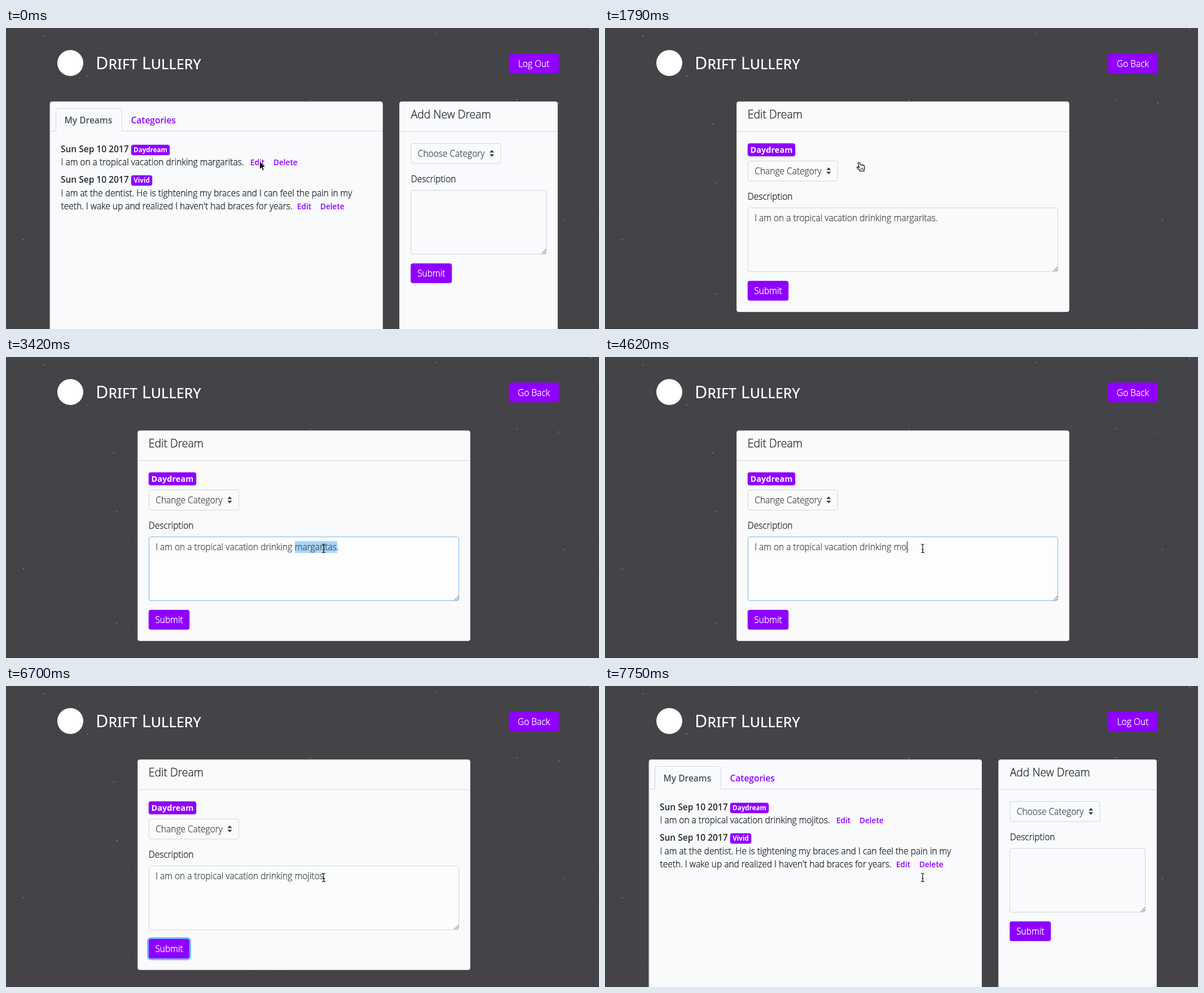
These frames come from a looping animation (1051x533 px, 8000 ms). An HTML page:

```html
<!DOCTYPE html>
<html lang="en">
<head>
<meta charset="utf-8">
<title>Drift Lullery</title>
<style>
  html, body { margin: 0; width: 100%; height: 100%; overflow: hidden; background: #444348; }
  svg { display: block; width: 1051px; height: 533px; }
  text {
    --ink: #25282b;
    font: 300 15.5px "Open Sans", "Noto Sans", sans-serif;
    fill: var(--ink); stroke: var(--ink); stroke-width: .35px; white-space: pre;
  }
  .head { font-size: 19.4px; }
  .semi { font-weight: 600; stroke: none; }
  .link { --ink: #8f00ff; font-weight: 600; font-size: 13.6px; stroke: none; }
  .field { --ink: #495057; }
  .tab { --ink: #8f00ff; }
  .white { --ink: #fff; text-anchor: middle; }
  .badge { font-weight: 700; font-size: 11.6px; stroke: none; }
  .big { font-size: 14.5px; }
  .title {
    --ink: #fff; font-family: "Noto Sans", "Open Sans", sans-serif; font-weight: 500;
    font-size: 30px; font-stretch: 62.5%; font-variant: small-caps; stroke: none;
  }
</style>
</head>
<body>
<svg id="stage" viewBox="0 0 1051 533"></svg>
<script>
const LOOP = 8000;
const PURPLE = '#8f00ff', LINE = '#d3d6da', EDGE = '#dcdcde';
const WORD_X = 511.8;

const text = (x, y, str, cls = '', id = '') =>
  `<text x="${x}" y="${y}" class="${cls}"${id && ` id="${id}"`}>${str}</text>`;
const rect = (x, y, w, h, fill, extra = '') =>
  `<rect x="${x}" y="${y}" width="${w}" height="${h}" fill="${fill}" ${extra}/>`;
const box = (x, y, w, h, fill, line = LINE, extra = '') =>
  rect(x + .5, y + .5, w - 1, h - 1, fill, `rx="3.5" stroke="${line}" ${extra}`);
const path = (d, extra) => `<path d="${d}" ${extra}/>`;
const group = (id, body) => `<g id="${id}">${body}</g>`;
const chip = (x, y, w, h) =>
  rect(x, y, w, h, PURPLE, `rx="3.5" stroke="${PURPLE}" stroke-width=".5"`);

const button = (x, y, w, label) =>
  chip(x, y, w, 34.5) + text(x + w / 2, y + 23, label, 'white');

const badge = (x, y, w, h, label, cls = '') =>
  chip(x, y, w, h) +
  text(x + w / 2, y + h / 2 + (cls ? 5.1 : 4.1), label, 'white badge ' + cls);

const select = (x, y, label) => {
  const cx = x + 143.5, cy = y + 18;
  return box(x, y, 160, 36.5, 'none') + text(x + 12.3, y + 23.5, label, 'field') +
    path(`M${cx - 4} ${cy - 1.5}l4-4.5 4 4.5zM${cx - 4} ${cy + 1.5}l4 4.5 4-4.5z`, 'fill="#343a40"');
};

const area = (x, y, w, fill, id) => box(x, y, w, 114, fill, LINE, `id="${id}"`) +
  path(`M${x + w - 8.5} ${y + 113}l8-8M${x + w - 4.5} ${y + 113}l4-4`, 'stroke="#444" stroke-width="1"');

const links = (x, y) => text(x, y, 'Edit', 'link') + text(x + 41, y, 'Delete', 'link');

function sky() {
  let seed = 17, out = '';
  const rnd = () => (seed = seed * 16807 % 2147483647) / 2147483647;
  const dot = (x, y, r, o) => `<circle cx="${x}" cy="${y}" r="${r}" fill="#fff" opacity="${o}"/>`;
  for (let i = 0; i < 170; i++) {
    out += dot((rnd() * 1051).toFixed(1), (rnd() * 533).toFixed(1),
      (.4 + rnd() * .4).toFixed(2), (.05 + rnd() * .14).toFixed(2));
  }
  const bright = [[191, 170], [145, 85], [196, 471], [197, 274], [67, 14], [763, 10],
    [906, 127], [980, 133], [1036, 2], [31, 375], [539, 128], [988, 341]];
  return out + bright.map(([x, y]) => dot(x, y, 1, .35)).join('');
}

const header = '<circle cx="114" cy="62" r="23" fill="#fff"/>' +
  text(159, 73, 'Drift Lullery', 'title', 'title');

const DASH = '#f8fafc';
const list =
  box(77.5, 130, 590.5, 420, DASH, EDGE) +
  path('M78 182.5H88.5V146.5q0-4 4-4H201.5q4 0 4 4V182.5H667.5', `fill="none" stroke="${LINE}"`) +
  text(103.5, 168.5, 'My Dreams', 'semi field') +
  text(221.5, 168.5, 'Categories', 'semi tab') +
  text(97, 220, 'Sun Sep 10 2017', 'semi') + badge(222, 207, 68, 18, 'Daydream') +
  group('before', text(97.5, 243.3, 'I am on a tropical vacation drinking margaritas.') + links(433, 243)) +
  group('after', text(97.5, 243.3, 'I am on a tropical vacation drinking mojitos.') + links(410, 243)) +
  group('underline', rect(433.5, 244, 12.5, 1, PURPLE)) +
  text(97, 274, 'Sun Sep 10 2017', 'semi') + badge(222, 261, 37, 18, 'Vivid') +
  text(97.5, 297.5, 'I am at the dentist. He is tightening my braces and I can feel the pain in my') +
  text(97.5, 320.7, "teeth. I wake up and realized I haven't had braces for years.") +
  links(516, 320.5);

const addForm =
  box(697, 130, 281, 420, DASH, EDGE) + rect(697.5, 183, 280, 1, LINE) +
  text(717.7, 160, 'Add New Dream', 'head') +
  select(717.5, 204, 'Choose Category') +
  text(717.7, 273, 'Description') +
  area(717, 287, 241, DASH, 'newArea') +
  button(717.5, 417, 72.5, 'Submit');

const editForm =
  rect(0, 532, 1051, 1, '#38373b') +
  box(233, 130, 590, 373, '#fafafa', EDGE) + rect(233.5, 183, 589, 1, LINE) +
  text(252.8, 160, 'Edit Dream', 'head') +
  badge(253, 204.5, 84, 22.5, 'Daydream', 'big') +
  select(253, 235, 'Change Category') +
  text(252.8, 304, 'Description') +
  area(253, 318, 550, '#fafafa', 'editArea') +
  group('marked', rect(512, 326, 75, 21, '#a8d5fb')) +
  text(265.2, 342, 'I am on a tropical vacation drinking', 'field') +
  text(WORD_X, 342, '', 'field', 'word') +
  rect(0, 326, 1, 21, '#222', 'id="caret"') +
  button(253, 448, 72, 'Submit') +
  group('glow', rect(251.5, 446.5, 75, 37.5, 'none', 'rx="5" stroke="#74b9ff" stroke-width="3"'));

// Each cursor is drawn around its hot spot.
const cursors =
  group('arrow', path('M0 0V14.5L3.4 11.3 5.6 16.4 8 15.4 5.9 10.4H10.4Z',
    'fill="#000" stroke="#fff" stroke-width="1" stroke-linejoin="round"')) +
  group('hand', path('M3.4 3.2q.9-1.9 2.7-.6l1.9 4q1.3-1 2.2.2 1.5-.8 2.2.5 1.7-.5 2.2 1l.5 4.5-1 2.7v2H7l-.6-1.5-4.4-4q-1-1.8.8-2.1l2.8 1.2z',
    'fill="#fff" stroke="#000" stroke-width="1.2" stroke-linejoin="round"') +
    path('M8 11.5v4M10 11.5v4M12 11.5v4', 'stroke="#000" stroke-width=".8"')) +
  group('beam', path('M-3-7.5q3 0 3 2 0-2 3-2M0-5.5V5.5M-3 7.5q3 0 3-2 0 2 3 2M-1.6 2.2h3.2',
    'fill="none" stroke="#111" stroke-width="1.2"'));

document.getElementById('stage').innerHTML =
  rect(0, 0, 1051, 533, '#444348') + sky() + header +
  group('dash', list + addForm) + group('edit', editForm) +
  group('logOut', button(891.5, 45.5, 88, 'Log Out')) +
  group('goBack', button(891.5, 45.5, 88, 'Go Back')) + cursors;

const el = id => document.getElementById(id);

// Size the title evenly so its line keeps its length in whichever width the font offers.
const title = el('title');
const size = Math.min(54, 30 * 187 / title.getComputedTextLength());
title.style.fontSize = size + 'px';
title.setAttribute('y', 62 + size * .36);

const steps = [
  [0, { page: 'dash', top: 'logOut', entry: 'before', cursor: ['arrow', 449.5, 236], word: 'margaritas' }],
  [1350, { cursor: ['hand', 445, 236] }],
  [1490, { underline: true }],
  [1790, { page: 'edit', top: 'goBack', underline: false }],
  [2240, { cursor: ['arrow', 457.5, 236.5] }],
  [2390, { cursor: ['beam', 610, 328.5] }],
  [2540, { cursor: ['beam', 587.5, 349] }],
  [2690, { cursor: ['beam', 563.5, 339] }],
  [2830, { cursor: ['beam', 563, 339] }],
  [3130, { caret: 562 }],
  [3280, { focus: 'area' }],
  [3420, { marked: true, caret: null }],
  [4620, { marked: false, word: 'mo', caret: 'end' }],
  [4920, { word: 'moj' }],
  [5070, { word: 'moji' }],
  [5370, { word: 'mojito' }],
  [5510, { word: 'mojitos' }],
  [6110, { caret: null }],
  [6700, { focus: 'submit' }],
  [7450, { top: null }],
  [7750, { page: 'dash', top: 'logOut', entry: 'after' }]
];

const show = (id, on) => { el(id).style.display = on ? '' : 'none'; };

function render(time) {
  const s = Object.assign({}, ...steps.filter(([at]) => at <= time).map(step => step[1]));
  for (const id of ['dash', 'edit']) show(id, s.page === id);
  for (const id of ['logOut', 'goBack']) show(id, s.top === id);
  for (const id of ['before', 'after']) show(id, s.entry === id);
  show('underline', s.underline);
  show('marked', s.marked);
  show('glow', s.focus === 'submit');

  const [kind, x, y] = s.cursor;
  for (const id of ['arrow', 'hand', 'beam']) show(id, kind === id);
  el(kind).setAttribute('transform', `translate(${x} ${y})`);

  const field = el('editArea'), active = s.focus === 'area';
  field.setAttribute('stroke', active ? '#78b8f0' : LINE);
  field.setAttribute('fill', active ? '#fdfdfd' : s.focus ? '#fbfdfc' : '#fafafa');

  const word = el('word');
  word.textContent = s.word + '.';
  show('caret', s.caret);
  if (s.caret) {
    const end = s.page === 'edit' ? word.getSubStringLength(0, s.word.length) : 0;
    el('caret').setAttribute('x', s.caret === 'end' ? Math.round(WORD_X + end) : s.caret);
  }
}

const start = performance.now();
let last = -1;
function tick() {
  const time = (performance.now() - start) % LOOP;
  const step = steps.filter(([at]) => at <= time).length;
  if (step !== last) render(time);
  last = step;
  requestAnimationFrame(tick);
}
tick();
</script>
</body>
</html>
```
